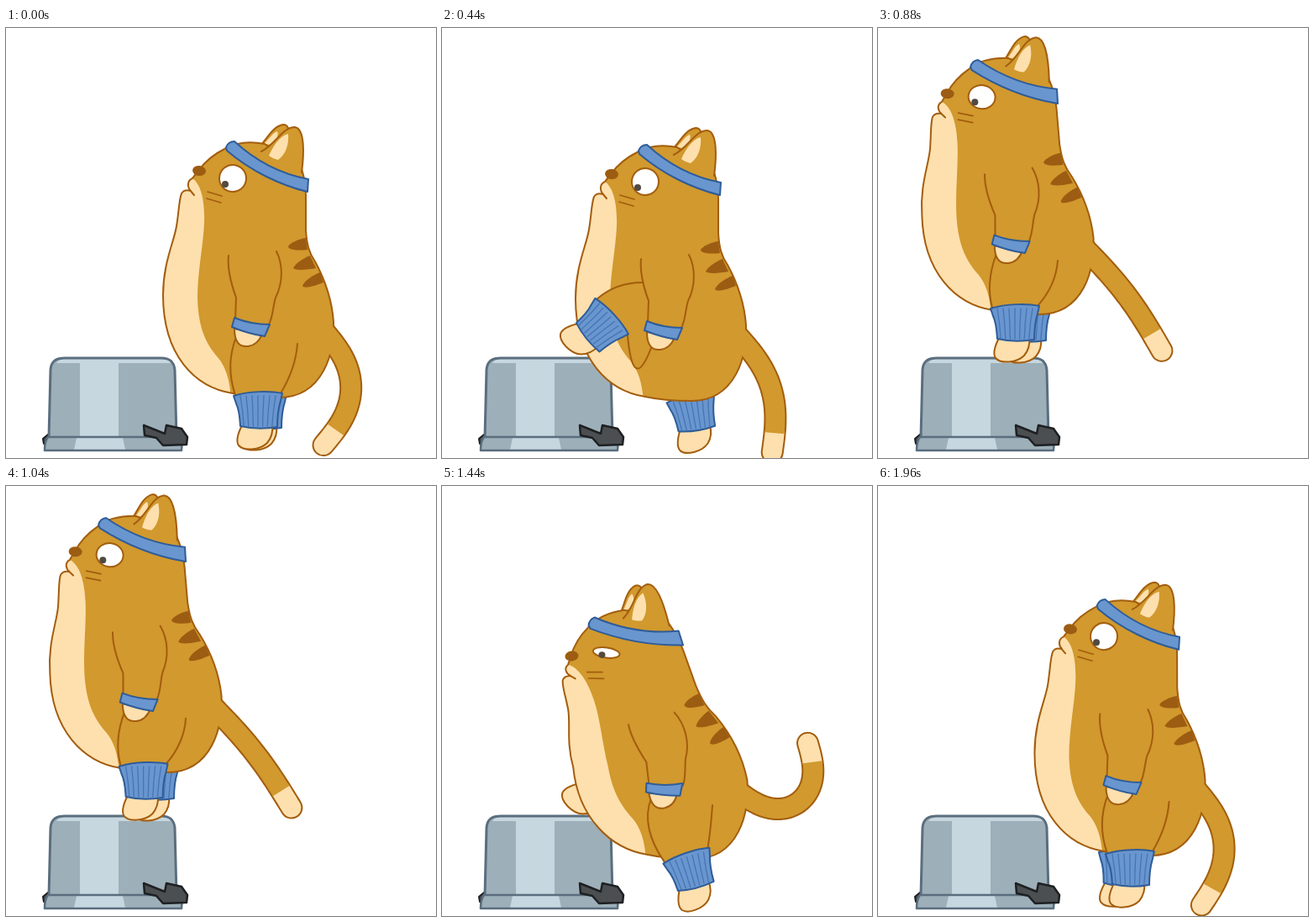
An HTML page with a canvas for the animation above (2 s loop, 512 px wide and 512 px high).

```html
<!DOCTYPE html>
<html lang="en">
<head>
<meta charset="utf-8">
<title>Step-up cat</title>
<style>
html, body { margin: 0; width: 100%; height: 100%; overflow: hidden; background: #fff; }
canvas { display: block; width: 512px; height: 512px; }
</style>
</head>
<body>
<canvas id="stage" width="512" height="512"></canvas>
<script>
const ctx = document.getElementById('stage').getContext('2d');
const LOOP = 2000, STEP = 40;
const FUR = '#d1992e', LINE = '#a35d0d', CREAM = '#fee0ae', MARK = '#9c5c12';
const BLUE = '#6996cf', NAVY = '#2f5c98', RIB = '#4675b3';
const STEEL = '#9dafb9', SHINE = '#c7d7e0', EDGE = '#5a6e7e', BLACK = '#1e2022', GRIP = '#4b4f52';

const rad = deg => deg * Math.PI / 180;
const clamp = v => Math.max(0, Math.min(1, v));
const same = (x, y) => [x, y];

function turn(x, y, deg, cx = 0, cy = 0) {
  const c = Math.cos(rad(deg)), s = Math.sin(rad(deg)), u = x - cx, v = y - cy;
  return [cx + u * c - v * s, cy + u * s + v * c];
}

// A rest pose plus weighted offsets
const pose = (rest, ...moves) =>
  rest.map((v, i) => moves.reduce((sum, [weight, by]) => sum + weight * by[i], v));

// The exercise is a chain of eased phases; every part follows a few of them.
function poseAt(t) {
  const ease = (from, to) => {
    const s = clamp((t - from) / (to - from));
    return s * s * (3 - 2 * s);
  };
  const lift = ease(0, 440), stand = ease(560, 820), rise = ease(580, 860);
  const kick = ease(1030, 1280), drop = ease(1088, 1340), crouch = ease(1190, 1430);
  const recover = ease(1480, 1990), lower = ease(1520, 1990), settle = ease(1620, 1990);
  const bend = 4 * rise + 11 * crouch - 15 * recover;
  return {
    body: pose([0, 0], [lift, [-28, 4]], [rise, [-105, -103]], [drop, [108, 103]], [settle, [25, -4]]),
    bend,
    tilt: -Math.min(4, bend),
    eye: 1 - .12 * rise * (1 - drop) - .62 * crouch * (1 - ease(1480, 1700)),
    tail: 90 - 17 * lift - 20 * rise - 88 * ease(1020, 1360) + 125 * ease(1490, 2010),
    // x, y and angle of each leg warmer
    near: pose([300, 455, 0], [lift, [-112, -100, 50]], [stand, [-25, -4, -50]],
      [kick, [133, 0, -16]], [drop, [0, 107, 0]], [recover, [4, -3, 16]]),
    far: pose([305, 456, 0], [lift, [-6, 2, -10]], [rise, [-122, -106, 10]],
      [kick, [6, 2, 20]], [crouch, [7, 3, 30]], [lower, [102, 99, -47]]),
    // front start and control, back start and control
    thigh: pose([274, 368, 261, 402, 347, 376, 345, 405],
      [lift - stand, [-7, -69, -26, -103, -70, 1, -90, 29]],
      [kick * (1 - crouch), [21, 13, 50, 16, 17, -33, 48, -32]])
  };
}

const trace = (d, map = same) => new Path2D(d.replace(/(-?[\d.]+),(-?[\d.]+)/g,
  (_, x, y) => map(+x, +y).map(v => v.toFixed(2)).join()));

function shape(d, fill, stroke, width = 2, map = same) {
  const path = trace(d, map);
  if (fill) { ctx.fillStyle = fill; ctx.fill(path); }
  if (stroke) { ctx.strokeStyle = stroke; ctx.lineWidth = width; ctx.stroke(path); }
}

function oval(x, y, rx, ry, tilt, fill, stroke) {
  ctx.beginPath();
  ctx.ellipse(x, y, rx, ry, rad(tilt), 0, 7);
  ctx.fillStyle = fill;
  ctx.fill();
  if (stroke) { ctx.strokeStyle = stroke; ctx.lineWidth = 2; ctx.stroke(); }
}

function drawPot() {
  const wall = 'M51,488 L53,407 C54,396 60,393 70,393 L185,393 C196,393 200,398 201,407 L203,488';
  const lip = 'M50,487 L205,487 C209,491 210,497 209,503 L46,503 C46,496 47,491 50,487 Z';
  shape('M50,484 L44,489 L45,495 L50,499 Z', GRIP, BLACK);
  shape(wall, STEEL);
  shape('M60,399 C63,394 67,394 72,394 L184,394 C190,394 194,395 196,399 Z', SHINE);
  shape('M88,399 L134,399 L134,488 L88,488 Z', SHINE);
  shape(wall, null, EDGE, 3);
  shape(lip, STEEL);
  shape('M84,488 L139,488 L142,502 L81,502 Z', SHINE);
  shape(lip, null, EDGE, 2.5);
  shape('M164,473 L189,483 L191,473 L209,477 L216,487 L215,496 L187,497 L179,488 L165,485 Z', GRIP, BLACK, 2.5);
}

const legMap = ([x, y, angle]) => (px, py) => {
  const [u, v] = turn(px, py, angle);
  return [u + x, v + y];
};

function drawFoot(map) {
  shape('M-19,18 C-23,26 -27,36 -23,42 C-17,49 2,48 11,39 C16,33 18,26 17,18 Z', CREAM, LINE, 2, map);
  shape('M-29,-17 C-10,-23 15,-23 29,-20 L27,-11 Q23,2 23,20 Q0,24 -21,19 Q-22,0 -26,-8 Z', BLUE, NAVY, 2, map);
  for (let i = -3; i <= 3; i++) {
    shape(`M${i * 7},-17 Q${i * 6},0 ${i * 5.6},19`, null, RIB, 1.3, map);
  }
}

// The tail curls the other way as it swings up.
function tailPoints(x, y, heading) {
  const count = 40, length = 155, curl = .89 * heading - 40, points = [[x, y]];
  for (let i = 0; i < count; i++) {
    const angle = rad(heading + curl * Math.sin(Math.PI * ((i + .5) / count - .5)));
    x += Math.cos(angle) * length / count;
    y += Math.sin(angle) * length / count;
    points.push([x, y]);
  }
  return points;
}

function strand(points, color, width, cap = 'round') {
  ctx.lineCap = cap;
  shape('M' + points.join(' L'), null, color, width);
  ctx.lineCap = 'round';
}

function drawCat(t) {
  const { body: [dx, dy], bend, tilt, eye, tail, near, far, thigh } = poseAt(t);

  // The torso leans more the higher a point lies; the head tilts on top of that.
  const warp = (x, y) => {
    const [hx, hy] = turn(x, y, tilt * clamp((215 - y) / 50), 250, 175);
    const weight = Math.sin(Math.PI / 2 * clamp((380 - hy) / 240));
    const [u, v] = turn(hx, hy, -bend * weight, 310, 380);
    return [u + dx, v + dy];
  };
  const wristMap = (x, y) => warp(...turn(x, y, -.75 * Math.max(0, bend - 5), 291, 360));
  const put = (d, fill, stroke, width) => shape(d, fill, stroke, width, warp);

  const spine = tailPoints(378 + dx, 360 + dy, tail);
  strand(spine, LINE, 27);

  // far leg
  const farThigh = [[310 + dx, 400 + dy], far.slice(0, 2)];
  strand(farThigh, LINE, 44, 'butt');
  strand(farThigh, FUR, 40, 'butt');
  drawFoot(legMap(far));

  // far ear
  put('M303,140 C312,130 318,117 330,115 C336,115 338,121 336,130 L322,144 Z', FUR, LINE);
  put('M307,138 C313,133 317,125 323,123 C325,127 322,134 317,139 Z', CREAM);

  // torso and head
  const torso = 'M222,179 C224,176 227,173 229,170 C236,160 248,150 262,143 C275,136 292,135 308,138'
    + ' L352,168 C356,180 357,190 357,200 L357,240 C358,258 361,268 368,278 C380,300 388,322 390,350'
    + ' C392,385 378,440 325,440 C305,440 288,439 270,435 C225,428 187,390 187,318'
    + ' C187,280 200,255 203,236 C206,218 206,204 209,197 C212,192 217,193 220,194'
    + ' C216,190 215,182 222,179 Z';
  put(torso, FUR);
  ctx.save();
  ctx.clip(trace(torso, warp));
  put('M222,179 C232,186 237,205 236,232 C235,258 228,290 228,322 C229,360 240,378 252,392'
    + ' C262,404 266,418 268,440 L170,440 L170,179 Z', CREAM);
  ctx.restore();
  put(torso + ' M219,193 L224,199', null, LINE);
  strand(spine.slice(34), CREAM, 23);
  strand(spine.slice(0, 35), FUR, 23, 'butt');

  // back stripes
  put('M357,250 C349,251 338,256 336,260 C337,265 349,265 359,264 Z', MARK);
  put('M362,271 C354,274 344,281 342,286 C345,289 358,288 369,286 Z', MARK);
  put('M374,291 C366,294 355,301 353,307 C355,311 368,307 378,303 Z', MARK);

  // near ear
  const ear = 'M304,147 C322,138 329,118 344,118 C356,120 355,150 352,172';
  put(ear + ' L330,170 Z', FUR);
  put(ear, null, LINE);
  put('M313,152 C318,141 325,129 336,126 C337,137 334,150 324,157 C319,156 316,154 313,152 Z', CREAM);

  // face
  put('M262,142 C264,137 268,135 272,135 C297,158 328,174 360,180 L359,195 C326,187 291,170 263,146 Z', BLUE, NAVY);
  oval(...warp(230, 170), 8, 6, 8 - bend, MARK);
  const [ex, ey] = warp(270, 179);
  oval(ex, ey, 16, 16 * eye, 8, '#fff', LINE);
  oval(ex - 9 + (1 - eye) * 6, ey + 7 * eye, 4, Math.min(4, 10 * eye), 0, '#514a42');
  put('M240,195 L257,200 M239,203 L256,208', null, LINE, 1.7);

  // near leg
  const map = legMap(near), front = map(-27, -18), back = map(27, -20);
  const [fx, fy, fcx, fcy, bx, by, bcx, bcy] = thigh.map((v, i) => v + (i % 2 ? dy : dx));
  const shin = `M${fx},${fy} Q${fcx},${fcy} ${front}`;
  shape(`${shin} L${back} Q${bcx},${bcy} ${bx},${by} Z`, FUR);
  shape(`${shin} M${bx},${by} Q${bcx},${bcy} ${back}`, null, LINE);
  drawFoot(map);

  // arm
  const inner = 'M265,271 C263,290 270,310 274,321 L273,348';
  const outer = '313,353 C318,344 318,330 321,321 C330,303 330,282 322,266';
  shape('M272,358 C272,374 278,380 288,379 C296,378 302,372 305,364 Z', CREAM, LINE, 2, wristMap);
  put(`${inner} L${outer} Z`, FUR);
  put(`${inner} M${outer}`, null, LINE);
  shape('M272,345 C284,350 300,353 314,353 L308,367 C294,365 281,361 269,356 Z', BLUE, NAVY, 2, wristMap);
}

const start = performance.now();

function frame() {
  const t = Math.floor((performance.now() - start) % LOOP / STEP) * STEP;
  ctx.fillStyle = '#fff';
  ctx.fillRect(0, 0, 512, 512);
  ctx.lineCap = ctx.lineJoin = 'round';
  drawPot();
  drawCat(t);
  requestAnimationFrame(frame);
}
frame();
</script>
</body>
</html>
```
